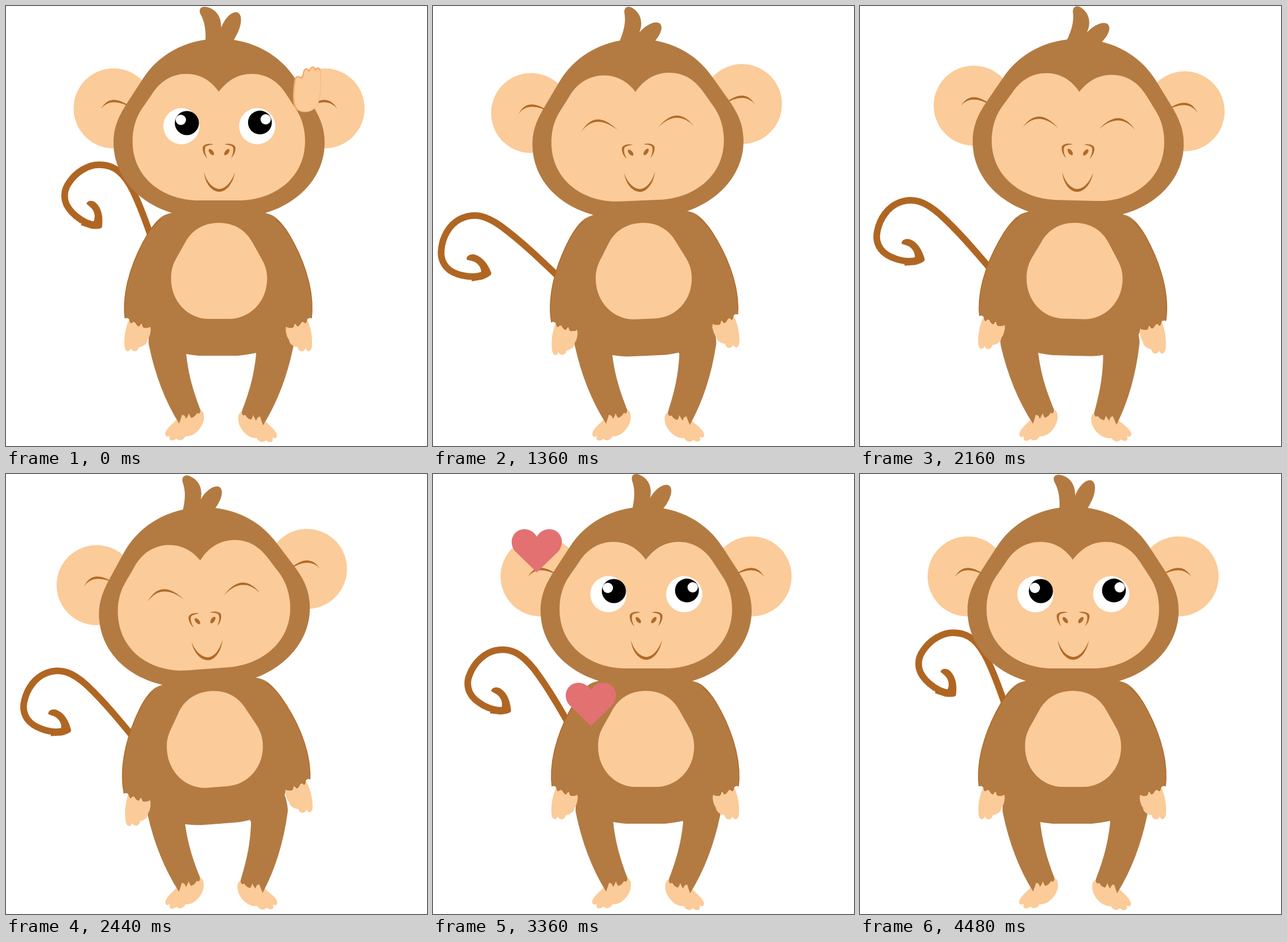
Recreate the animation shown at these times as an HTML page with a canvas. Size 732 px wide and 765 px high, loop 4.52 s.

```html
<!DOCTYPE html>
<html lang="en">
<head>
<meta charset="utf-8">
<title>Monkey</title>
<style>
  html, body { margin: 0; width: 100%; height: 100%; overflow: hidden; background: #fff; }
  canvas { display: block; }
</style>
</head>
<body>
<canvas id="stage" width="732" height="765"></canvas>
<script>
const ctx = document.getElementById('stage').getContext('2d');
const LOOP = 4520, STEP = 40;
const DANCE = 1140, HEARTS = 2780;
const FUR = '#b37b42', SKIN = '#fbcb99', TAIL = '#b06623', LINE = '#b06a28', PINK = '#e37172';

const shape = {
  tail: 'M270 455C252 400 239 360 221 322C206 292 190 276 162 276C143 276 122 288 109 308C102 318 100.500 328 103 339C107 355 130 378 156 381',
  curl: 'M140 344C142 337 151 338 156 342C167 352 169 368 167 384C166 388 158 388 148 387L130 381L136 371L152 375C157 366 153 355 147 350Z',
  leg: 'M270 556L251 560Q246 582 249 592C259 640 276 686 301 726Q304 718 306 711Q311 710 313 718Q317 712 318 708Q321 717 323 716Q328 714 330 711Q332 706 335 709Q338 708 338 702C326 670 317 642 313 602L330 560Z',
  foot: 'M303 712C296 722 280 732 277 742C276 749 281 750 285 747C281 757 291 757 296 752C302 758 309 754 312 748C326 750 342 734 344 718C345 708 342 703 337 702Z',
  hand: 'M215 543C207 560 205 577 206 592C208 603 215 602 217 595C219 602 229 603 231 593C240 592 246 586 246 580C250 576 252 566 252 558Z',
  side: 'M372 350L300 350Q292 359 283 361C266 365 254 383 246 397C223 436 204 485 206 532L207 543Q212 541 215 546Q217 554 219 550Q222 547 225 550Q229 558 232 556Q235 550 237 553Q238 560 241 559Q247 560 251 557C252 580 275 603 335 608L372 608Z',
  arm: 'M270 371C260 377 252 387 246 397C223 436 204 485 206 532L207 543',
  cuff: 'M215 546Q217 554 219 550Q222 547 225 550Q229 558 232 556Q235 550 237 553Q238 560 241 559Q247 560 251 557',
  belly: 'M370 377C342 377 322 391 311 412L297 437C290 449 287 459 287 474C287 515 318 544 352 544L388 544C423 544 454 515 454 474C454 459 450 449 443 437L429 412C418 391 398 377 370 377Z',
  head: 'M370 56.500C311 58 264 85 237 128L211 168C194 194 187 213 187 238C187 308 250 362 330 367L410 367C490 362 554 308 554 238C554 213 547 194 530 168L504 128C477 85 430 58 370 56.500Z',
  face: 'M370 149C356 129 337 118 314 118C288 118 268 131 254 153L236 179C226 194 220 213 220 235C220 300 275 338 335 338L405 338C465 338 520 300 520 235C520 213 514 194 504 179L487 153C473 131 453 118 427 118C404 118 385 129 370 149Z',
  hair: 'M346 72C349 42 345 26 338 14C334 5 340 -1 350 2C366 6 375 20 374 38C380 22 392 9 402 11C412 15 409 32 404 44Q399 55 392 66Z',
  nose: 'M361 240.500C352 238 342 241 342 247C342 254 345 260 350 265C347 259 345 253 346 247C347 242 353 242 361 240.500Z',
  mouth: 'M344 289C350 309 362 318 371 318C380 318 391 309 398 289C394 312 381 323 371 323C360 323 347 312 344 289Z',
  palm: 'M503 126C499 150 498 176 508 181C520 188 538 183 543 168C548 150 548 130 546 112C544 106 540 107 538 112C536 104 530 104 527 114C524 107 518 108 517 118C516 126 514 126 512 125C509 122 505 122 503 126Z',
  fingers: 'M508 181C498 176 499 150 503 126C505 122 509 122 512 125C514 126 516 126 517 118C518 108 524 107 527 114C530 104 536 104 538 112C540 107 544 106 546 112',
  heart: 'M0 37L-38 0C-51 -17 -40 -38 -22 -38C-11 -38 -4 -32 0 -25C4 -32 11 -38 22 -38C40 -38 51 -17 38 0Z'
};
const path = {};
for (const k in shape) path[k] = new Path2D(shape[k]);

// time, value pairs joined by cosine easing
const TAIL_KEYS = [[0, 0], [446, 29], [892, 0], [1395, 26], [1830, 0], [2285, 29], [2630, 0],
  [3107, 29], [3555, 0], [4020, 29], [4480, 0], [LOOP, 0]];
const LEAN_KEYS = [[1120, 0], [1570, -4.400], [1990, 4.400], [2430, -4.400], [3170, 4.400]];

function ease(keys, t) {
  let i = 0;
  while (i < keys.length - 2 && t >= keys[i + 1][0]) i++;
  const [t0, a] = keys[i], [t1, b] = keys[i + 1];
  return a + (b - a) * (1 - Math.cos(Math.PI * (t - t0) / (t1 - t0))) / 2;
}

function fill(p, color) {
  ctx.fillStyle = color;
  ctx.fill(p);
}

function stroke(p, color, width) {
  ctx.strokeStyle = color;
  ctx.lineWidth = width;
  ctx.stroke(p);
}

function dot(x, y, r, color) {
  ctx.beginPath();
  ctx.arc(x, y, r, 0, 7);
  ctx.fillStyle = color;
  ctx.fill();
}

function group(draw) {
  ctx.save();
  draw();
  ctx.restore();
}

function turn(deg, x, y) {
  ctx.translate(x, y);
  ctx.rotate(deg * Math.PI / 180);
  ctx.translate(-x, -y);
}

function mirror(sum, dy = 0) {
  ctx.translate(sum, dy);
  ctx.scale(-1, 1);
}

// thin crescent, pointed at both ends
function brow(x0, y0, cx, cy, x1, y1, w) {
  ctx.beginPath();
  ctx.moveTo(x0, y0);
  ctx.quadraticCurveTo(cx, cy, x1, y1);
  ctx.quadraticCurveTo(cx, cy + w * 2, x0, y0);
  ctx.fillStyle = LINE;
  ctx.fill();
}

function drawTail(angle) {
  group(() => {
    turn(-angle, 287, 552);
    stroke(path.tail, TAIL, 11.500);
    fill(path.curl, TAIL);
  });
}

function drawLeg(deg) {
  turn(deg, 312, 735);
  fill(path.foot, SKIN);
  fill(path.leg, FUR);
}

function drawSide() {
  fill(path.hand, SKIN);
  fill(path.side, FUR);
  stroke(path.arm, LINE, 1.500);
  stroke(path.cuff, LINE, 1);
}

function drawEar() {
  dot(187, 178, 69.500, SKIN);
  brow(165, 179, 182, 148, 220, 178, 4);
}

function nostril() {
  fill(path.nose, LINE);
  ctx.beginPath();
  ctx.ellipse(357, 254, 6.500, 3.200, 0.900, 0, 7);
  ctx.fillStyle = LINE;
  ctx.fill();
}

function drawEyes(closed) {
  if (closed) {
    brow(273, 214, 299, 174, 336, 214, 4);
    brow(406, 213, 441, 173, 469, 213, 4);
    return;
  }
  dot(305, 209, 31.500, '#fff');
  dot(314.500, 203.500, 21, '#000');
  dot(304, 198, 9, '#fff');
  dot(436.800, 209, 31.500, '#fff');
  dot(441.500, 202.500, 20.700, '#000');
  dot(451.500, 197, 9, '#fff');
}

function drawHead(hairAngle, closed) {
  group(drawEar);
  group(() => { mirror(741); drawEar(); });
  group(() => { turn(hairAngle, 356, 60); fill(path.hair, FUR); });
  fill(path.head, FUR);
  fill(path.face, SKIN);
  drawEyes(closed);
  nostril();
  group(() => { mirror(741); nostril(); });
  fill(path.mouth, LINE);
}

function drawPalm(t) {
  group(() => {
    turn(-1.600 * (1 - Math.cos(t * 2 * Math.PI / 280)), 522, 180);
    fill(path.palm, SKIN);
    stroke(path.palm, '#f5b777', 1);
    stroke(path.fingers, '#f2ab69', 2.200);
  });
}

function heart(x, y) {
  group(() => { ctx.translate(x, y); fill(path.heart, PINK); });
}

function drawHearts(t) {
  if (t < 2840 || t >= 4480) return;
  if (Math.floor((t - 2800) / 280) % 2 === 0) {
    heart(180.500, 134);
    heart(274.500, 401);
  } else {
    heart(554, 511);
  }
}

function render(t) {
  const dancing = t >= DANCE && t < HEARTS;
  const lean = dancing ? ease(LEAN_KEYS, t) : 0;
  const bend = dancing ? Math.pow(Math.sin(Math.PI * (t - 1120) / 1680), 0.800) : 0;
  const swing = ease(TAIL_KEYS, t);

  ctx.fillStyle = '#fff';
  ctx.fillRect(0, 0, 732, 765);
  ctx.lineJoin = 'round';

  group(() => { turn(lean, 370, 570); drawTail(swing); });
  group(() => drawLeg(-1.500 * bend));
  group(() => { mirror(748, 3); drawLeg(5.600 * bend); });
  group(() => {
    turn(lean, 370, 570);
    group(drawSide);
    group(() => { mirror(738); drawSide(); });
    fill(path.belly, SKIN);
    drawHead(swing * 0.850, dancing);
  });
  if (t < DANCE) drawPalm(t);
  drawHearts(t);
}

const start = performance.now();
function tick() {
  const t = (performance.now() - start) % LOOP;
  render(Math.floor(t / STEP) * STEP);
  requestAnimationFrame(tick);
}
tick();
</script>
</body>
</html>
```
